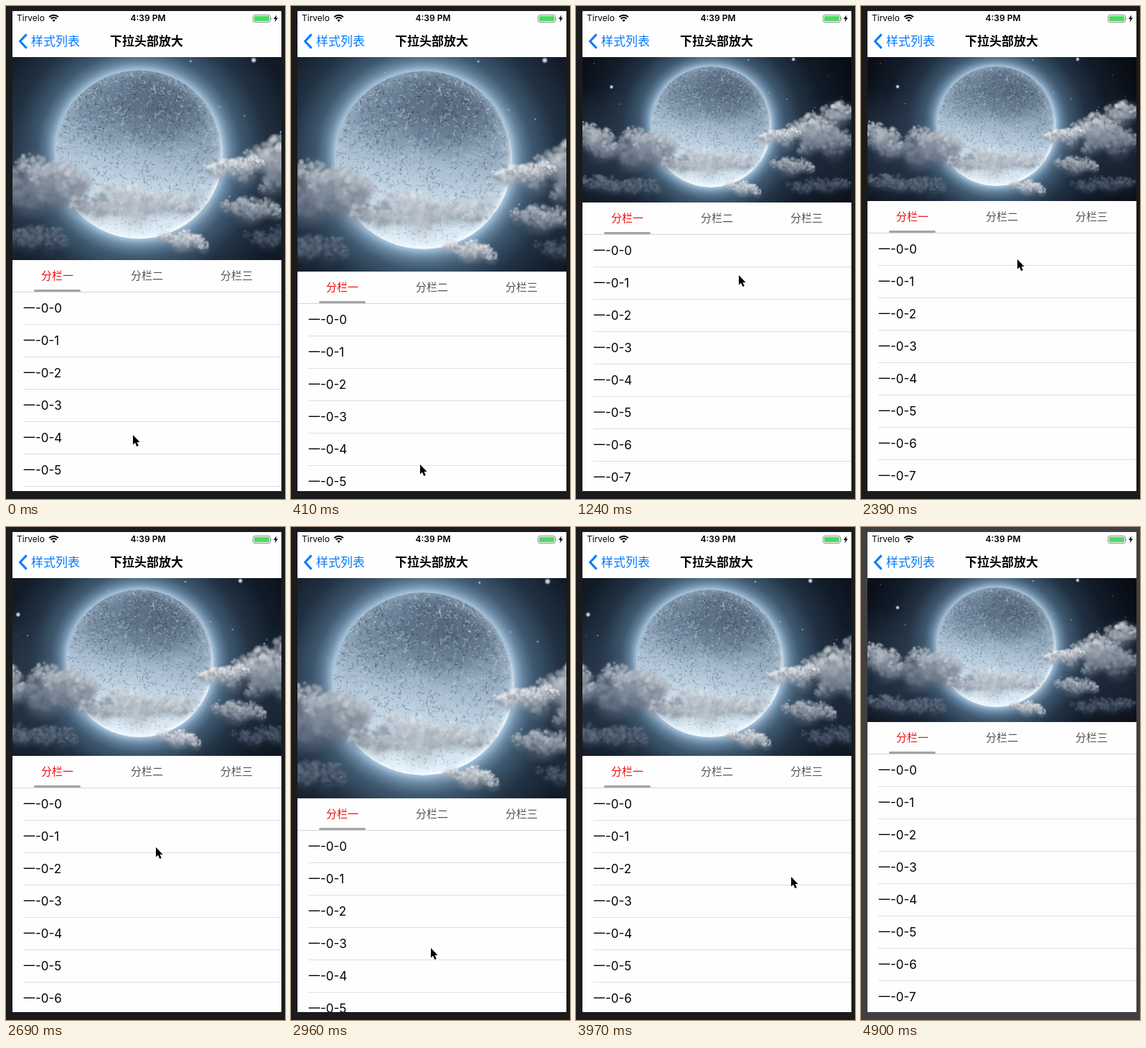
Recreate the animation shown at these times as an HTML page with a canvas. Size 389 px wide and 685 px high, loop 5000 ms.

```html
<!DOCTYPE html>
<html lang="zh-CN">
<head>
<meta charset="utf-8">
<title>下拉头部放大</title>
<style>
  html, body { margin: 0; width: 100%; height: 100%; overflow: hidden; background: #1b1b1b; }
  body { position: relative; font-family: Inter, "Noto Sans CJK SC", "Noto Sans CJK", sans-serif; color: #000; }
  svg, span, div, canvas { position: absolute; white-space: nowrap; }
  #phone { left: 9px; top: 7px; width: 375px; height: 667px; background: #fefefe; overflow: hidden; }
  #chrome { left: 0; top: 0; width: 389px; height: 685px; }
  .status { top: 7px; line-height: 20px; font-size: 12px; }
  .nav { top: 27px; line-height: 44px; font-size: 17px; }
  #header { left: 0; top: 64px; width: 375px; overflow: hidden; background: #0a0e16; }
  #photo { top: 0; height: 100%; }
  #list { left: 0; width: 375px; height: 700px; background: #fefefe; }
  .tab { top: 0; width: 125px; line-height: 43px; font-size: 15px; text-align: center; color: #555; }
  .tab.on { color: #f01010; }
  .bar { left: 30px; top: 41px; width: 65px; height: 3px; border-radius: 1.5px; background: #a4a4a4; }
  .rule { left: 0; top: 44px; width: 375px; height: 1px; background: #d6d6d6; }
  .row { left: 15px; width: 360px; height: 44px; line-height: 45px; font-size: 17px; border-bottom: 1px solid #dedee0; }
  #pointer { left: 0; top: 0; overflow: visible; }
</style>
</head>
<body>
<div id="phone">
  <div id="header"><canvas id="photo" width="750" height="400"></canvas></div>
  <div id="list"><div class="bar"></div><div class="rule"></div></div>
</div>
<svg id="chrome" viewBox="0 0 389 685">
  <g fill="none" stroke="#000" stroke-width="2">
    <path d="M60.3 15.2a9 9 0 0 1 12.6 0M62.6 17.7a5.6 5.6 0 0 1 8 0"/>
    <path d="M64.4 19.6q2.2-1.7 4.4 0l-2.2 2.4z" fill="#000" stroke="none"/>
  </g>
  <rect x="344.5" y="12.5" width="24" height="10" rx="2.5" fill="#fff" stroke="#8b8b8b"/>
  <rect x="346" y="14" width="21" height="7" rx="1" fill="#4cd964"/>
  <path d="M369.7 15.5q1.6 2 0 4z" fill="#8b8b8b"/>
  <path d="M377.3 12.5l-4.2 5.4h2.5l-1 4.3 4.5-5.6h-2.6z"/>
  <path d="M28.6 39.4l-9 9.6 9 9.6" fill="none" stroke="#087bff" stroke-width="3"/>
</svg>
<span class="status" style="left:15px">Tirvelo</span>
<span class="status" style="left:148px;width:100px;text-align:center;font-weight:600">4:39 PM</span>
<span class="nav" style="left:35px;color:#087bff">样式列表</span>
<span class="nav" style="left:145px;font-weight:600">下拉头部放大</span>
<svg id="pointer" width="14" height="20">
  <path d="M0 0V13.6L3 10.8 5.3 16 7.8 14.9 5.6 9.9H9.6Z" stroke="#fff" stroke-width="1.6" paint-order="stroke"/>
</svg>
<script>
const $ = id => document.getElementById(id);
const LOOP = 5000, BASE = 200;
const mix = (a, b, k) => a + (b - a) * k;

// ---------- list ----------
function add(className, text, style) {
  const el = document.createElement('div');
  el.className = className;
  el.textContent = text;
  Object.assign(el.style, style);
  $('list').append(el);
}
['一', '二', '三'].forEach((n, i) =>
  add(i ? 'tab' : 'tab on', '分栏' + n, { left: i * 125 + 'px' }));
for (let i = 0; i < 9; i++) add('row', '一-0-' + i, { top: 45 + i * 45 + 'px' });

// ---------- moonlit sky, drawn once in a 375 x 200 space ----------
let seed = 11;
const rand = () => (seed = (seed * 16807) % 2147483647) / 2147483647;
const span = (a, b) => mix(a, b, rand());
const MOON = { x: 179.5, y: 96, r: 83 };
const g = $('photo').getContext('2d');
g.scale(2, 2);

function fade(gradient, stops) {
  stops.forEach(([at, color]) => gradient.addColorStop(at, color));
  return gradient;
}
function disc(x, y, r, fill) {
  g.fillStyle = fill;
  g.beginPath();
  g.arc(x, y, r, 0, 7);
  g.fill();
}
function soft(x, y, r, rgb, alpha) {
  disc(x, y, r, fade(g.createRadialGradient(x, y, 0, x, y, r), [
    [0, `rgba(${rgb},${alpha})`], [.55, `rgba(${rgb},${alpha * .65})`], [1, `rgba(${rgb},0)`]]));
}

function drawSky() {
  const { x, y } = MOON;
  g.fillStyle = fade(g.createRadialGradient(x, y, 78, x, y, 235), [
    [0, '#a6c4dc'], [.06, '#6f8eaa'], [.15, '#3f5970'], [.3, '#223243'],
    [.5, '#121c29'], [.75, '#0a0f18'], [1, '#05070c']]);
  g.fillRect(0, 0, 375, BASE);
  for (let i = 0; i < 36; i++) soft(span(0, 375), span(0, 170), span(.6, 1.5), '200,222,245', span(.3, .9));
  soft(42, 41, 3, '230,245,255', 1);
  soft(293, 3, 3, '230,245,255', 1);
}

function drawMoon() {
  const { x, y, r } = MOON;
  g.save();
  g.shadowColor = '#c8e4fa';
  g.shadowBlur = 22;
  disc(x, y, r, '#c5dced');
  g.restore();
  g.save();
  g.beginPath();
  g.arc(x, y, r, 0, 7);
  g.clip();
  disc(x, y, r, fade(g.createLinearGradient(x + 16, y - r, x - 14, y + r), [
    [0, '#788da2'], [.2, '#71869b'], [.42, '#93a9bd'], [.65, '#bdd1e1'], [1, '#e6f2f9']]));
  soft(200, 47, 52, '52,69,90', .45);
  soft(150, 62, 34, '75,95,117', .3);
  // Wrinkles, strong near the dark top and faint below.
  for (let i = 0; i < 2600; i++) {
    const a = span(0, 2 * Math.PI), d = r * Math.sqrt(rand());
    const px = x + d * Math.cos(a), py = y + d * Math.sin(a);
    const depth = 1 - (py - y + r) / (2 * r) * .6;
    const turn = span(0, 2 * Math.PI);
    g.strokeStyle = rand() < .5 ? `rgba(30,47,68,${.42 * depth})` : `rgba(222,235,246,${.4 * depth})`;
    g.lineWidth = span(.4, 1);
    g.beginPath();
    g.arc(px, py, span(.8, 3.5), turn, turn + span(.6, 2));
    g.stroke();
  }
  disc(x, y, r, fade(g.createRadialGradient(x - 2, y - 4, r * .84, x - 2, y - 4, r + 4), [
    [0, 'rgba(225,242,255,0)'], [.6, 'rgba(225,242,255,.22)'], [1, 'rgba(248,253,255,1)']]));
  g.restore();
}

// A bank of billowing lobes strung between two points, each lit from above.
function cloudBank(x1, y1, x2, y2, thick, light, alpha) {
  const tint = tone => [mix(50, 236, tone), mix(67, 238, tone), mix(90, 240, tone)].map(Math.round);
  const count = Math.ceil(Math.hypot(x2 - x1, y2 - y1) / thick * 3) + 2;
  for (let i = 0; i < count; i++) {
    const k = (i + rand()) / count;
    const r = thick * span(.4, .75) * mix(.6, 1, Math.sin(Math.PI * k));
    const cx = mix(x1, x2, k), cy = mix(y1, y2, k) + span(-.35, .35) * thick;
    soft(cx, cy + r * .3, r * 1.35, tint(light * .5), alpha * .55);
    for (let j = 0; j < 26; j++) {
      const a = span(0, 2 * Math.PI), d = Math.sqrt(rand());
      const tone = light * (.78 - .3 * d * Math.sin(a) + span(-.2, .16));
      soft(cx + d * r * Math.cos(a), cy + d * r * .75 * Math.sin(a), r * span(.16, .4),
        tint(Math.min(1, Math.max(0, tone))), alpha * span(.5, 1));
    }
  }
}

function drawClouds() {
  soft(20, 130, 90, '48,65,86', .6);
  soft(355, 130, 80, '40,55,74', .6);
  cloudBank(0, 172, 110, 178, 16, .32, .4);
  cloudBank(285, 178, 375, 172, 14, .25, .3);
  cloudBank(0, 118, 145, 148, 24, .5, .5);
  cloudBank(0, 97, 42, 118, 23, .82, .65);
  cloudBank(62, 108, 128, 126, 23, .84, .6);
  cloudBank(110, 150, 245, 138, 22, 1, .3);
  cloudBank(140, 128, 230, 150, 15, 1.1, .3);
  cloudBank(300, 122, 375, 108, 24, .62, .5);
  cloudBank(285, 106, 375, 76, 27, .9, .65);
  cloudBank(240, 113, 300, 103, 13, 1.1, .7);
  cloudBank(264, 144, 318, 150, 15, .72, .6);
  cloudBank(200, 174, 246, 184, 12, 1.05, .65);
}

drawSky();
drawMoon();
drawClouds();

// ---------- motion ----------
// Within each burst the screen refreshes at a steady cadence.
const BURSTS = [0, 60, 830, 2390, 2960, 3970, 4900], CADENCE = 82;

// Pointer key poses: time, x, y.
const POSES = [
  [0, 177, 596], [390, 180, 637], [660, 182, 659], [800, 182, 659], [1240, 227, 374], [1900, 219, 311],
  [2090, 218, 335], [2380, 218, 335], [2390, 218, 352], [2960, 195, 585], [3100, 196, 589],
  [3640, 204, 554], [3830, 206, 554], [3970, 300, 486], [4680, 306, 700], [LOOP, 306, 720]];

const DRAGS = [
  { start: 0, grab: 424.6, release: 800 },
  { start: 2390, grab: 352, release: 3846 }];

function pointerAt(t) {
  const i = Math.max(1, POSES.findIndex(p => p[0] >= t));
  const [a, b] = [POSES[i - 1], POSES[i]];
  const k = (t - a[0]) / (b[0] - a[0]);
  const eased = k * k * (3 - 2 * k);
  return { x: mix(a[1], b[1], eased), y: mix(a[2], b[2], eased) };
}

// Rubber-band resistance while dragging, critically damped return after release.
const band = d => 603 * (1 - 1 / (Math.max(0, d) * .55 / 603 + 1));
function stretchAt(t) {
  const { grab, release } = DRAGS.findLast(d => t >= d.start);
  const pulled = band(pointerAt(Math.min(t, release - 20)).y - grab);
  const x = Math.max(0, t - release) * .0135;
  return pulled * (1 + x) * Math.exp(-x);
}

function render(now) {
  const time = now % LOOP;
  const burst = BURSTS.findLast(b => b <= time);
  const t = burst + Math.floor((time - burst) / CADENCE) * CADENCE;
  const height = BASE + Math.round(stretchAt(t));
  const width = 375 * height / BASE;
  $('header').style.height = height + 'px';
  $('photo').style.width = width + 'px';
  $('photo').style.left = (375 - width) / 2 + 'px';
  $('list').style.top = 64 + height + 'px';
  const p = pointerAt(t), ended = t >= 4900;
  $('pointer').style.transform = `translate(${Math.round(p.x)}px,${Math.round(p.y)}px)`;
  $('pointer').style.visibility = ended ? 'hidden' : 'visible';
  document.body.style.background = ended ? '#404040' : '#1b1b1b';
}

const began = performance.now();
(function frame() {
  render(performance.now() - began);
  requestAnimationFrame(frame);
})();
</script>
</body>
</html>
```
